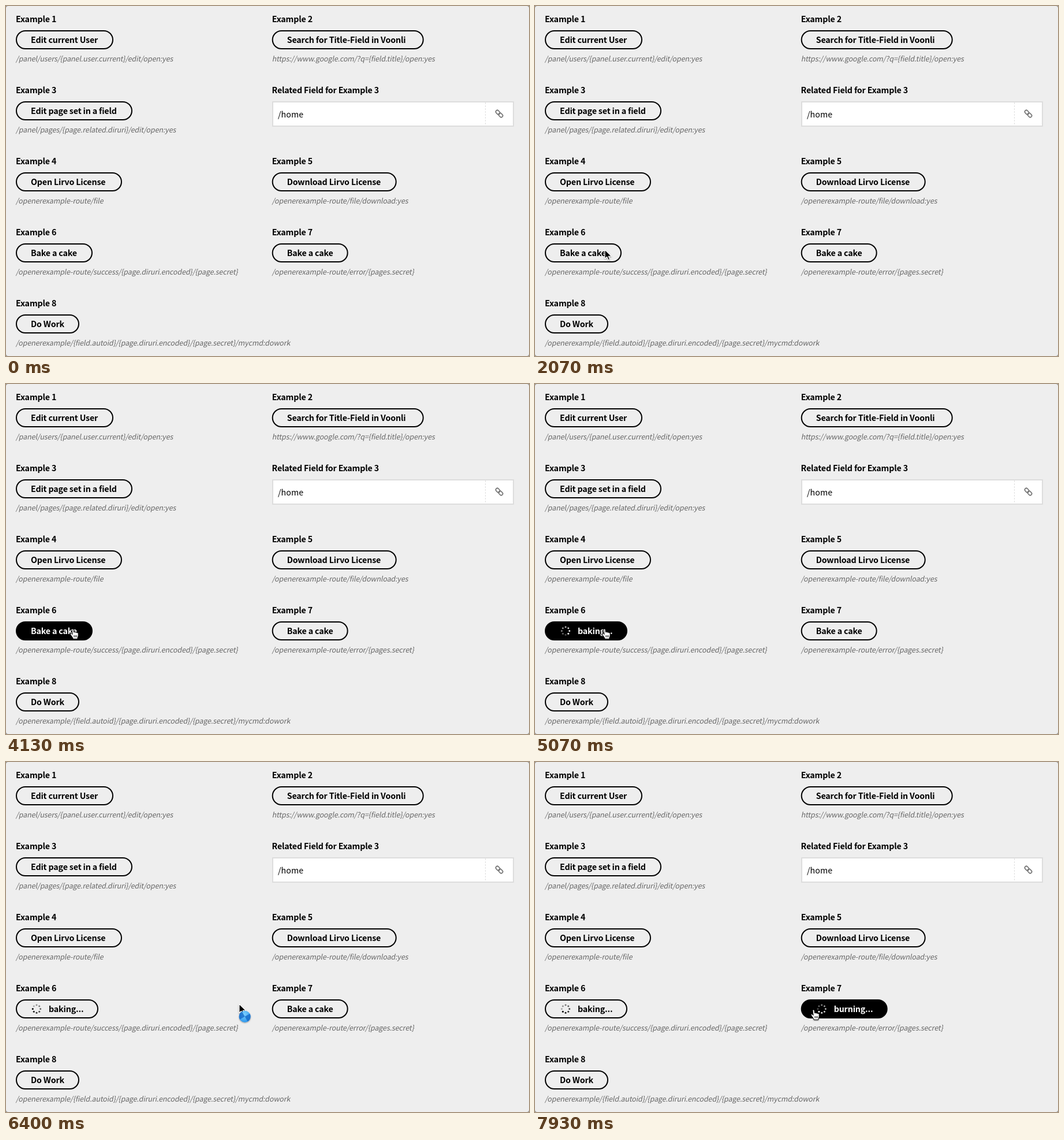
Recreate the animation shown at these times as an HTML page. Size 906x606 px, loop 8000 ms.

```html
<!DOCTYPE html>
<html lang="en">
<head>
<meta charset="utf-8">
<title>Opener buttons</title>
<style>
  html, body { margin: 0; width: 100%; height: 100%; overflow: hidden; background: #8a8a8a; }
  svg { display: block; }
  text { font-family: "Noto Sans CJK JP", "Noto Sans CJK SC", "Noto Sans", sans-serif; white-space: pre; }
  .bold { font-size: 14.3px; font-weight: 700; letter-spacing: -.19px; }
  .value { font-size: 14.3px; }
  .hint { font-size: 12.52px; letter-spacing: -.12px; fill: #666; }
  .pill { fill: none; stroke: #000; stroke-width: 2; }
  .hover .pill { fill: #000; }
  .hover { fill: #fff; }
</style>
</head>
<body>
<svg id="stage" width="906" height="606" viewBox="0 0 906 606">
  <defs>
    <radialGradient id="ball" cx=".45" cy=".3" r=".75">
      <stop offset="0" stop-color="#7cd0ff"/>
      <stop offset="1" stop-color="#2a94ea"/>
    </radialGradient>
    <filter id="shadow" x="-50%" y="-50%" width="200%" height="200%">
      <feDropShadow dx="0" dy="1" stdDeviation="1" flood-opacity=".4"/>
    </filter>
  </defs>
  <rect width="906" height="606" rx="4" fill="#eee"/>
  <g id="form"></g>
  <g id="field">
    <text class="bold" x="460.5" y="151">Related Field for Example 3</text>
    <rect x="462" y="166" width="417" height="42" fill="#fff" stroke="#ddd" stroke-width="2"/>
    <path d="M830.5 167V207" stroke="#ddd" stroke-dasharray="3 2"/>
    <text class="value" x="471" y="193">/home</text>
    <g transform="translate(854.5 186.5) rotate(45)" fill="none" stroke="#777" stroke-width="1.7">
      <rect x="-7.4" y="-2.7" width="8" height="5.4" rx="2.5"/>
      <rect x="-.6" y="-2.7" width="8" height="5.4" rx="2.5"/>
    </g>
  </g>
  <g id="cursor">
    <path id="arrow" filter="url(#shadow)" d="M0 0V15.5L3.6 12.2L6.1 17.8L8.6 16.7L6.2 11.2H11.2Z"
          stroke="#fff" stroke-width="1.1" stroke-linejoin="round"/>
    <g id="hand" filter="url(#shadow)" fill="#fff" stroke="#000" stroke-linejoin="round">
      <path d="M-2 1.4C-2 -.5 .8 -.5 1 1.4L1.6 6C2 4.7 4 4.8 4.3 6.3C4.8 5.2 6.6 5.5 6.8 7C7.5 6 9.2 6.6 9.2 8.2
               V11.5C9.2 13.4 8 14 7.8 17.3H.2C0 15.3 -1.7 13.8 -3 11.8L-4.6 9.2C-5.2 7.8 -3.5 6.9 -2.3 8.2L-.9 9.6Z"/>
      <path d="M2 11V14.5M4.2 11V14.5M6.3 11V14.5" fill="none" stroke-width=".9"/>
    </g>
    <g id="wait" filter="url(#shadow)">
      <circle r="10" fill="url(#ball)"/>
      <path id="blades" d="M0 0V-10A10 10 0 0 1 10 0ZM0 0V10A10 10 0 0 1 -10 0Z" fill="#1264c4" opacity=".75"/>
    </g>
  </g>
</svg>
<script>
const LOOP = 8000, SPIN = 540, DOTS = 8;
const $ = id => document.getElementById(id);

function add(parent, tag, attrs, content = '') {
  const node = document.createElementNS('http://www.w3.org/2000/svg', tag);
  for (const key in attrs) node.setAttribute(key, attrs[key]);
  node.textContent = content;
  return parent.appendChild(node);
}

const show = (node, visible) => node.setAttribute('visibility', visible ? 'visible' : 'hidden');

function addExample(number, x, row, width, caption, hint) {
  const y = row * 123;
  add($('form'), 'text', { class: 'bold', x, y: y + 28 }, `Example ${number}`);
  const button = add($('form'), 'g', {});
  const pill = add(button, 'rect', { class: 'pill', x: x + 1, y: y + 43, width: width - 2, height: 31, rx: 15.5 });
  const label = add(button, 'text', { class: 'bold', x: x + 26, y: y + 64 }, caption);
  add($('form'), 'text', { class: 'hint', transform: `translate(${x} ${y + 96}) skewX(-11)` }, hint);
  return { button, pill, label, x, y, width, caption };
}

const LEFT = 17, RIGHT = 460.7;
addExample(1, LEFT, 0, 169, 'Edit current User', '/panel/users/{panel.user.current}/edit/open:yes');
addExample(2, RIGHT, 0, 263, 'Search for Title-Field in Voonli', 'https://www.google.com/?q={field.title}/open:yes');
addExample(3, LEFT, 1, 202, 'Edit page set in a field', '/panel/pages/{page.related.diruri}/edit/open:yes');
addExample(4, LEFT, 2, 184, 'Open Lirvo License', '/openerexample-route/file');
addExample(5, RIGHT, 2, 216, 'Download Lirvo License', '/openerexample-route/file/download:yes');
const cake = addExample(6, LEFT, 3, 133, 'Bake a cake', '/openerexample-route/success/{page.diruri.encoded}/{page.secret}');
const burnt = addExample(7, RIGHT, 3, 132, 'Bake a cake', '/openerexample-route/error/{pages.secret}');
addExample(8, LEFT, 4, 110, 'Do Work', '/openerexample/{field.autoid}/{page.diruri.encoded}/{page.secret}/mycmd:dowork');

Object.assign(cake, { busyCaption: 'baking...', busyWidth: 143, hover: [2100, 5250], click: 4600 });
Object.assign(burnt, { busyCaption: 'burning...', busyWidth: 150, hover: [6680, LOOP], click: 7250 });

for (const item of [cake, burnt]) {
  item.spinner = add(item.button, 'g', { transform: `translate(${item.x + 36} ${item.y + 58.5})` });
  item.dots = Array.from({ length: DOTS }, (_, i) => {
    const angle = i / DOTS * 2 * Math.PI;
    return add(item.spinner, 'circle', { cx: 6.7 * Math.sin(angle), cy: -6.7 * Math.cos(angle), r: 1.5 });
  });
}

// Cursor tip: time, x, y
const path = [
  [350, 345, 612], [1270, 228, 473], [2070, 121, 422], [2350, 116, 424], [4950, 116, 424],
  [5670, 181, 424], [6400, 404, 419], [6850, 483, 429], [LOOP, 483, 429]
];

function cursorAt(time) {
  const next = path.findIndex(point => point[0] > time);
  if (next < 1) return path[0].slice(1);
  const [t0, x0, y0] = path[next - 1], [t1, x1, y1] = path[next];
  const u = (time - t0) / (t1 - t0), k = u * u * (3 - 2 * u);
  return [x0 + (x1 - x0) * k, y0 + (y1 - y0) * k];
}

const within = (time, [from, to]) => time >= from && time < to;

function drawButton(item, time) {
  const busy = time >= item.click;
  item.button.setAttribute('class', within(time, item.hover) ? 'hover' : '');
  item.pill.setAttribute('width', (busy ? item.busyWidth : item.width) - 2);
  item.label.setAttribute('x', item.x + (busy ? 57 : 26));
  item.label.textContent = busy ? item.busyCaption : item.caption;
  show(item.spinner, busy);
  const head = Math.floor(time / SPIN * DOTS);
  item.dots.forEach((dot, i) => {
    const age = (head - i + DOTS) % DOTS;
    dot.setAttribute('opacity', 1 - (age + DOTS) % DOTS * .1);
  });
}

function draw(time) {
  drawButton(cake, time);
  drawButton(burnt, time);
  const pointing = within(time, cake.hover) || within(time, burnt.hover);
  const [x, y] = cursorAt(time);
  $('cursor').setAttribute('transform', `translate(${x.toFixed(1)} ${y.toFixed(1)})`);
  show($('arrow'), !pointing);
  show($('hand'), pointing);
  show($('wait'), within(time, [5350, 6680]));
  $('wait').setAttribute('transform', 'translate(9.7 21.7)');
  $('blades').setAttribute('transform', `rotate(${Math.floor(time / 65) * 30})`);
}

const start = performance.now();
function tick() {
  draw((performance.now() - start) % LOOP);
  requestAnimationFrame(tick);
}
tick();
</script>
</body>
</html>
```
